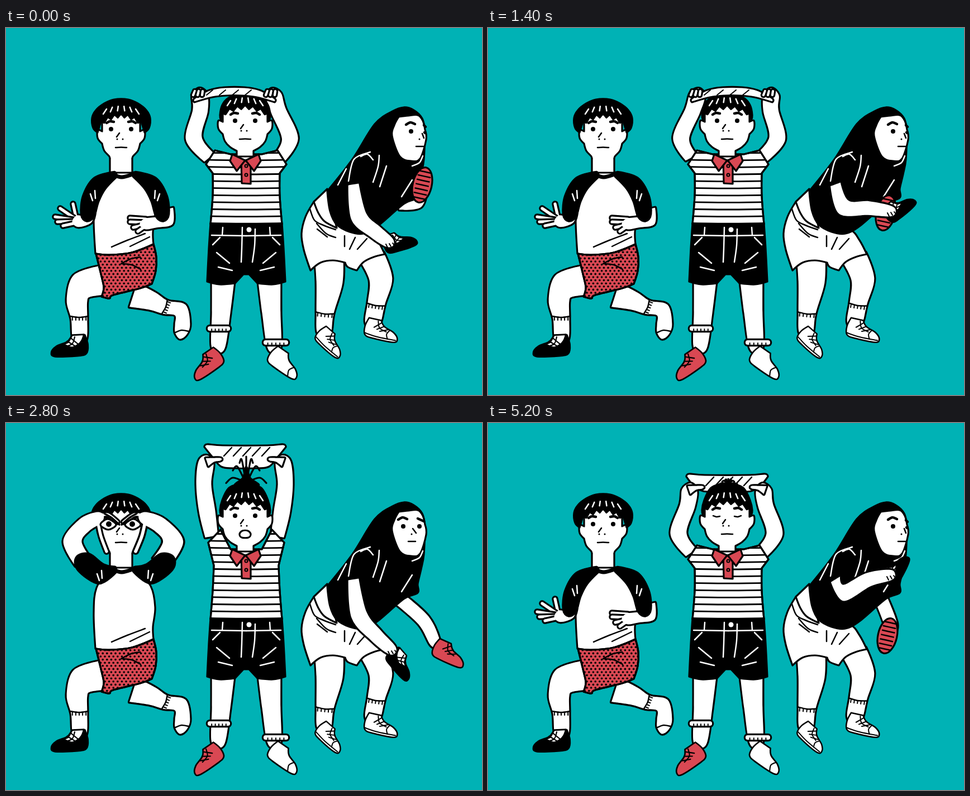
These frames come from a looping animation (852 px wide and 657 px high, 5300 ms). An HTML page with a canvas:

```html
<!DOCTYPE html>
<html lang="en">
<head>
<meta charset="utf-8">
<title>Three kids</title>
<style>
html, body { margin: 0; height: 100%; overflow: hidden; background: #00b2b5 }
canvas { display: block; width: 100vw; height: 100vh }
</style>
</head>
<body>
<canvas width="852" height="657"></canvas>
<script>
const g = document.querySelector('canvas').getContext('2d');
const TEAL = '#00b2b5', RED = '#d94853', INK = '#000', WHITE = '#fff', W = 3.2;
const { sin, cos, PI } = Math;
const lerp = (a, b, u) => a + (b - a) * u;
g.lineJoin = g.lineCap = 'round';

// "x,y[,radius]" points joined by a smooth curve, "!" marks a corner
const parse = s => s.split(' ').map(t => {
  const [x, y, r] = t.split(',').map(parseFloat);
  return { x, y, r, k: t.endsWith('!') ? 0 : 1 / 6 };
});
const pts = s => typeof s === 'string' ? parse(s) : s;
const mix = (a, b, u) => {
  const q = parse(b);
  return parse(a).map((p, i) => ({ ...p, x: lerp(p.x, q[i].x, u), y: lerp(p.y, q[i].y, u) }));
};
// right half, optional points in between, then the half mirrored
function sym(half, cx, cy = 0, between = []) {
  const p = pts(half), place = d => ({ x, y, k }) => ({ x: cx + d * x, y: cy + y, k });
  return [...p.map(place(1)), ...between, ...p.map(place(-1)).reverse()];
}

function curve(s, closed) {
  const p = pts(s), n = p.length, path = new Path2D();
  const at = i => closed ? p[(i + n) % n] : p[Math.max(0, Math.min(n - 1, i))];
  path.moveTo(p[0].x, p[0].y);
  for (let i = 0; i < (closed ? n : n - 1); i++) {
    const a = at(i - 1), b = at(i), c = at(i + 1), d = at(i + 2);
    path.bezierCurveTo(b.x + (c.x - a.x) * b.k, b.y + (c.y - a.y) * b.k,
      c.x - (d.x - b.x) * c.k, c.y - (d.y - b.y) * c.k, c.x, c.y);
  }
  if (closed) path.closePath();
  return path;
}
function stroke(path, color, w) {
  g.strokeStyle = color; g.lineWidth = w; g.stroke(path);
}
function paint(path, fill) {
  g.fillStyle = fill; g.fill(path);
  stroke(path, INK, W);
  return path;
}
const shape = (s, fill = WHITE) => paint(curve(s, true), fill);
const line = (s, color = INK, w = 2.5) => s.split('|').forEach(t => stroke(curve(t), color, w));
function tube(s, w) {
  line(s, INK, w + W / 2);
  line(s, WHITE, w - W * 1.5);
}
function dot(x, y, r, fill = INK) {
  g.fillStyle = fill;
  g.beginPath(); g.arc(x, y, r, 0, 7); g.fill();
}
function inside(path, draw) {
  g.save(); g.clip(path); draw(); g.restore();
  stroke(path, INK, W);
}
function at(x, y, turn, sx, sy, draw) {
  g.save(); g.translate(x, y); g.scale(sx, sy); g.rotate(turn); draw(); g.restore();
}
function both(cx, draw) {
  draw();
  at(2 * cx, 0, 0, -1, 1, draw);
}

// tapered tube along a centre line, with optional fingers
function limb(s, fill = WHITE, fingers = '') {
  const p = pts(s), a = [], b = [], end = p[p.length - 1];
  let dir;
  p.forEach((q, i) => {
    const u = p[i - 1] || q, v = p[i + 1] || q, r = q.r - W / 2, k = i ? 1 / 6 : 0;
    dir = Math.atan2(v.y - u.y, v.x - u.x);
    a.push({ x: q.x + r * sin(dir), y: q.y - r * cos(dir), k });
    b.unshift({ x: q.x - r * sin(dir), y: q.y + r * cos(dir), k });
  });
  const cap = { x: end.x + end.r * .8 * cos(dir), y: end.y + end.r * .8 * sin(dir), k: 1 / 6 };
  const path = curve([...a, cap, ...b], true);
  stroke(path, INK, W * 2);
  if (fingers) fingers.split('|').forEach(f => tube(f, 10));
  g.fillStyle = fill; g.fill(path);
}

// toe to the right; a bare foot has a toe seam and no laces
function shoe(x, y, turn, size, fill, flip = 1, bare = false) {
  at(x, y, turn, flip * size, size, () => {
    shape('-13,-25! 14,-25! 24,-13 46,-5 57,7 50,16 4,17 -14,13 -18,-5', fill);
    if (bare) return line('41,-7 35,4 40,16');
    if (fill === WHITE) line('-16,9 15,12 54,11|37,-8 32,2 36,12');
    if (fill === INK) shape('-11,-26! 13,-26! 22,-12 30,-8 16,-1 2,-6 -6,-14');
    for (let i = 0; i < 3; i++) line(`${2 + i * 7},${-7 + i * 3} ${16 + i * 8},${-20 + i * 6}`);
    line('8,-22 14,-8 30,-3');
  });
}
function sock(x, y, w, turn = 0) {
  at(x, y, turn, 1, 1, () => {
    line(`${-w},-1 0,1 ${w},-1`);
    for (let i = -2; i < 3; i++) line(`${i * w * .38},1 ${i * w * .38},6`, INK, 2);
  });
}

function face(cx, y, hw, nw, neck) {
  shape(sym(`${hw},-28! ${hw},2! ${hw + 8},0 ${hw + 8},14 ${hw},24! ${hw - 4},37 ${hw - 13},47 ${nw},54! ${nw},${neck}!`, cx, y));
}
function features(cx, y, open = 0, closed = false) {
  both(cx, () => {
    line(`${cx - 26},${y - 11} ${cx - 20},${y - 14} ${cx - 13},${y - 13}`, INK, 4.5);
    if (closed) line(`${cx - 25},${y} ${cx - 19},${y + 2} ${cx - 13},${y + 1}`);
    else dot(cx - 18, y, 4);
  });
  line(`${cx - 3},${y + 7} ${cx - 8},${y + 14}`);
  dot(cx - 7, y + 18, 1.5); dot(cx + 3, y + 18, 1.5);
  if (open > .1) shape(sym(`5,${-6 * open} 10,0 6,${6 * open}`, cx, y + 33));
  else line(`${cx - 10},${y + 33} ${cx},${y + 32.5} ${cx + 10},${y + 33}`);
}
function hair(cx, y, half, hw) {
  const fringe = [];
  for (let i = 0; i < 13; i++) {
    const t = 1 - i / 6;
    fringe.push({ x: cx + t * hw, y: y - 28 + 14 * t * t + i % 2 * 7, k: 0 });
  }
  shape(sym(half, cx, y, fringe), INK);
  for (let t = -1; t <= 1; t += .4)
    line(`${cx + t * 26},${y - 41 + 5 * t * t} ${cx + t * 32},${y - 33 + 6 * t * t}`, WHITE);
}

// ---- left: lunging boy ----
const lunge = [
  { sleeve: '196,262,5 168,278,14 152,305,15 146,335,12', cuff: [151, 297] },
  { sleeve: '196,262,5 165,276,16 131,273,16', cuff: [147, 275] },
  { sleeve: '196,262,5 170,270,18 139,249,18', cuff: [163, 270] }
];
function lungeArms(pose) {
  if (pose === 0) {
    limb('149,325,12 147,342,10 128,346,12', WHITE, '126,342 120,315|122,340 97,323|120,343 88,338|122,346 92,347|125,349 102,354');
    limb('284,325,17 288,344,14 268,348,11 248,351,11', WHITE, '250,342 222,340|248,348 222,347|246,353 228,357|246,357 236,364');
  } else if (pose === 1) {
    limb('135,273,16 115,266,16 117,232,16 134,200,14 154,193,12', WHITE, '154,188 161,171|156,192 176,176|158,195 172,189');
    limb('290,262,14 308,260,16 294,234,16 272,209,13 258,205,11', WHITE, '258,207 236,210|256,203 247,197');
  } else {
    const goggle = () => limb('138,249,17 119,212,18 140,183,15 166,169,12', WHITE, '165,180 170,203 180,230|168,166 182,164 199,177');
    goggle();
    at(430, 0, 0, -1.1, 1, goggle);
  }
}
function drawLunger(pose) {
  limb('228,478,24 262,489,18 286,500,14 312,505,15 316,530,15 313,547,12');
  sock(285, 499, 13, -1.2);
  line('301,546 314,541 327,543');
  limb('172,452,28 136,462,26 127,488,20 131,520,16 132,556,14');
  sock(131, 517, 16);
  shoe(131, 572, .05, .88, INK, -1);

  shape('187,258! 162,295 157,340 160,404! 185,407 225,402 264,387! 263,365 267,330 259,292 230,258!');
  line('189,392 217,380 249,368|222,391 257,374');
  const shorts = shape('161,404! 185,406 225,402 264,387! 269,410 268,435 261,458! 240,466 192,478 185,484 171,481! 175,465 171,445', RED);
  inside(shorts, () => {
    for (let r = 0; r < 18; r++)
      for (let x = 158 + r % 2 * 3.8; x < 272; x += 7.6) dot(x, 390 + r * 5.6, 1.8);
  });
  line('206,422 224,413 240,410|207,422 225,424 241,432');

  face(206, 183, 34, 20, 76);
  line('188,261 207,267 229,261', INK, 7);
  features(206, 181);
  hair(206, 181, '13,-53 30,-46 45,-34 52,-20 50,-2 42,6!', 36);
  const { sleeve, cuff: [x, y] } = lunge[pose];
  lungeArms(pose);
  both(213, () => {
    limb(sleeve, INK);
    line(`${x},${y} ${x + 4},${y + 12}|${x + 8},${y - 6} ${x + 9},${y + 8}`, WHITE);
  });
  if (pose === 2) both(205, () => {
    shape('169,182 182,172 197,182 183,191');
    line('176,162 188,169 203,182', INK, 3.5);
    dot(184, 181, 5);
  });
}

// ---- middle: boy with the ruler ----
// slide: sideways shift while rubbing, up: 0..1 height of the lifted ruler
function drawTall(slide, up) {
  const lifted = up !== null, h = lifted ? up : 0, s = lifted ? 0 : slide;

  both(430, () => limb('389,445,22 385,510,18 380,570,14'));
  shoe(374, 595, .6, .84, RED, -1);
  shoe(484, 593, .6, .84, WHITE, 1, true);
  [[381, 538, 16], [483, 563, 18]].forEach(([x, y, w]) => {
    tube(`${x - w},${y} ${x + w},${y}`, 13);
    for (let i = -2; i < 3; i++) line(`${x + i * w * .4},${y + 1} ${x + i * w * .4},${y + 6}`, INK, 2);
  });
  shape(sym('64,350! 67,395 70,454! 48,459 20,457! 5,441!', 430), INK);
  both(430, () => line('368,371 430,372|388,357 387,371|383,375 370,388|377,402 400,421|380,428 405,434', WHITE));
  line('423,357 422,395 421,419|446,360 445,390 441,419', WHITE);
  dot(435, 361, 4.5, WHITE);

  const top = lerp(92, 39, h), hand = lerp(118, 68, h);
  if (lifted) {
    shape(sym(`40,1 68,-1 73,4! 60,20 43,${lerp(30, 39, h)} 20,${lerp(31, 42, h)}`, 428, top));
    for (let x = 390; x < 470; x += 17) line(`${x},${top + 20} ${x + 14},${top + 5}`);
  }
  [-1, 1].forEach(d => {
    const arm = mix('63,232,13 86,198,16 70,148,15 66,120,15', '59,203,13 67,158,15 73,110,13 69,70,14', h);
    limb(arm.map((p, i) => ({ ...p, x: 427 + d * p.x + s * i / 3 })));
  });
  if (lifted) both(428, () => limb(`360,${hand + 2},9 372,${hand - 2},5 383,${hand - 3},4`));

  const shirt = shape(sym(mix('28,226! 56,219! 72,244! 60,260! 60,300 64,351!', '28,226! 46,191! 68,214! 58,255! 60,300 64,351!', h), 430).reverse());
  inside(shirt, () => {
    for (let y = 198; y < 350; y += 12.6) line(`350,${y} 430,${y + 1} 510,${y}`, INK, 2.8);
  });
  face(428, 166, 40, 15, 64);
  shape('421,238! 438,238! 438,279! 422,278!', RED);
  both(428.5, () => shape('405,226! 428,237! 413,256! 401,238!', RED));
  [247, 263].forEach(y => { dot(430, y, 3.5); dot(430, y, 1.5, RED); });
  const crown = lifted ? -56 : -46;
  hair(428, 166, `14,${crown} 30,${crown * .8 - 4} 41,-28 45,-10 43,0!`, 42);
  features(428, 166, h, lifted && !h);

  if (lifted) { // hair pulled up by the ruler
    const k = .2 + .8 * h, w = .45 + .55 * h, p = (x, y) => `${430 + x * w},${110 - y * k}`;
    shape([p(-20, -2), p(-6, 12), p(0, 32), p(7, 12), p(22, -2)].join(' '), INK);
    for (let i = -3; i <= 3; i++) line([p(i, 5), p(i * 8, 48 - i * i * 4), p(i * 12, 43 - i * i * 4.5)].join(' '), INK, 3.2);
  } else {
    shape(sym('18,106 45,111 72,126 72,133! 40,124 15,121', 423 + s));
    for (let x = 373; x < 460; x += 23) line(`${x + s},120 ${x + 11 + s},111`, INK, 2);
    [-72, 58].forEach(x => {
      for (let j = 0; j < 3; j++) tube(`${421 + x + j * 8 + s},120 ${424 + x + j * 7 + s},113`, 9);
    });
  }
}

// ---- right: crouching kid with shoes on the hands ----
// turn: angle of the circling hands, null once they rest
function drawCroucher(turn) {
  const rest = turn === null, c = cos(turn), s = sin(turn);
  const near = rest ? { x: 690, y: 406 } : { x: 703 - 18 * s - 17 * c, y: 328 + 56 * c };
  const far = rest ? { x: 768, y: 393 } : { x: 730 + 15 * c + 18 * s, y: 331 - 50 * c };

  limb('655,410,24 671,450,22 663,492,17 656,528,15');
  sock(662, 496, 16, .15);
  shoe(656, 541, .22, .82, WHITE);
  limb('578,410,27 579,455,25 571,510,17 569,545,14');
  sock(571, 511, 17, .1);
  shoe(568, 555, .72, .77, WHITE);

  shape('551,311! 536,338 529,368 533,397 545,434! 563,420 585,416 607,420! 612,428 628,434! 640,419 658,410 678,405! 665,380 648,360 600,335!');
  shape('551,311! 575,288! 592,358! 570,346 559,331');
  line('544,324 552,344 568,353 590,361|556,350 573,368 590,375|557,360 575,374|606,372 606,391|625,375 615,396|646,377 629,396');

  limb(`703,314,13 ${lerp(703, far.x, .5) + 12},${lerp(314, far.y, .5) + (rest ? 0 : 14)},13 ${far.x},${far.y},11`);
  shape('692,149 712,142 730,147 745,162 750,185! 748,235 743,262 737,288 737,304 712,315 665,355 640,368 615,365 592,352 580,328 575,292! 620,235 660,172', INK);
  shape('703,159! 720,157 737,156 746,166 750,182! 752,200 741,234 725,238 705,230 691,193 695,174');
  const x = rest ? 711 : 725; // the head turns to the front at rest
  line(`${x - 9},173 ${x - 1},169 ${x + 7},172`, INK, 4.5);
  dot(x, 185, 4);
  if (rest) {
    line('737,171 748,176', INK, 4.5);
    dot(740, 185, 4);
  } else line('748,174 751,177|749,187 750,188', INK, 4.5);
  line(`${x + 20 - 3 * rest},189 ${x + 23},197|${x + 9},212 ${x + 22},212`);
  dot(x + 15, 199, 1.5);
  line('635,230 647,226 657,236|668,228 666,248 657,276|681,247 669,284|609,252 594,281|652,222 623,235 613,274|727,272 708,302|746,229 740,241 727,247', WHITE);

  if (rest) shoe(778, 409, .42, .82, RED);
  else at(far.x, far.y, .22, 1, 1, () => {
    const sole = new Path2D();
    sole.ellipse(0, 0, 17, 32, 0, 0, 7);
    paint(sole, RED);
    for (let y = -24; y <= 24; y += 8) line(`-11,${y} 11,${y}`);
  });

  shoe(near.x + 5, near.y + (rest ? 16 : 5), rest ? .85 : -.3 - .4 * (1 - c), .78, INK);
  limb(`622,280,11 ${lerp(622, near.x, .15)},${lerp(282, near.y, .3) + 25},16 ${lerp(622, near.x, .6)},${lerp(282, near.y, .75) + 6},14 ${near.x},${near.y},11`);
  for (let i = 0; i < 3; i++) line(`${near.x - 6 + i * 6},${near.y + 3 - i} ${near.x - 3 + i * 6},${near.y + 9 - i * 2}`, INK, 2);
}

// beats of 100 ms, 53 per loop
function draw(n) {
  g.fillStyle = TEAL;
  g.fillRect(0, 0, 852, 657);
  drawLunger(n === 18 || n === 43 ? 1 : n > 18 && n < 43 ? 2 : 0);
  const up = n < 25 ? null : Math.min(1, (n - 25) / 3, (52 - n) / 4);
  drawTall(-14 * cos(n * PI / 2), up);
  const resting = n > 23 && n < 44, step = (n > 43 ? n + 1 : n) % 5;
  drawCroucher(resting ? null : Math.max(step / 2, step - 1) * PI / 2);
}

let last = -1;
const start = performance.now();
function tick() {
  const n = Math.floor((performance.now() - start) / 100) % 53;
  if (n !== last) draw(last = n);
  requestAnimationFrame(tick);
}
tick();
</script>
</body>
</html>
```
